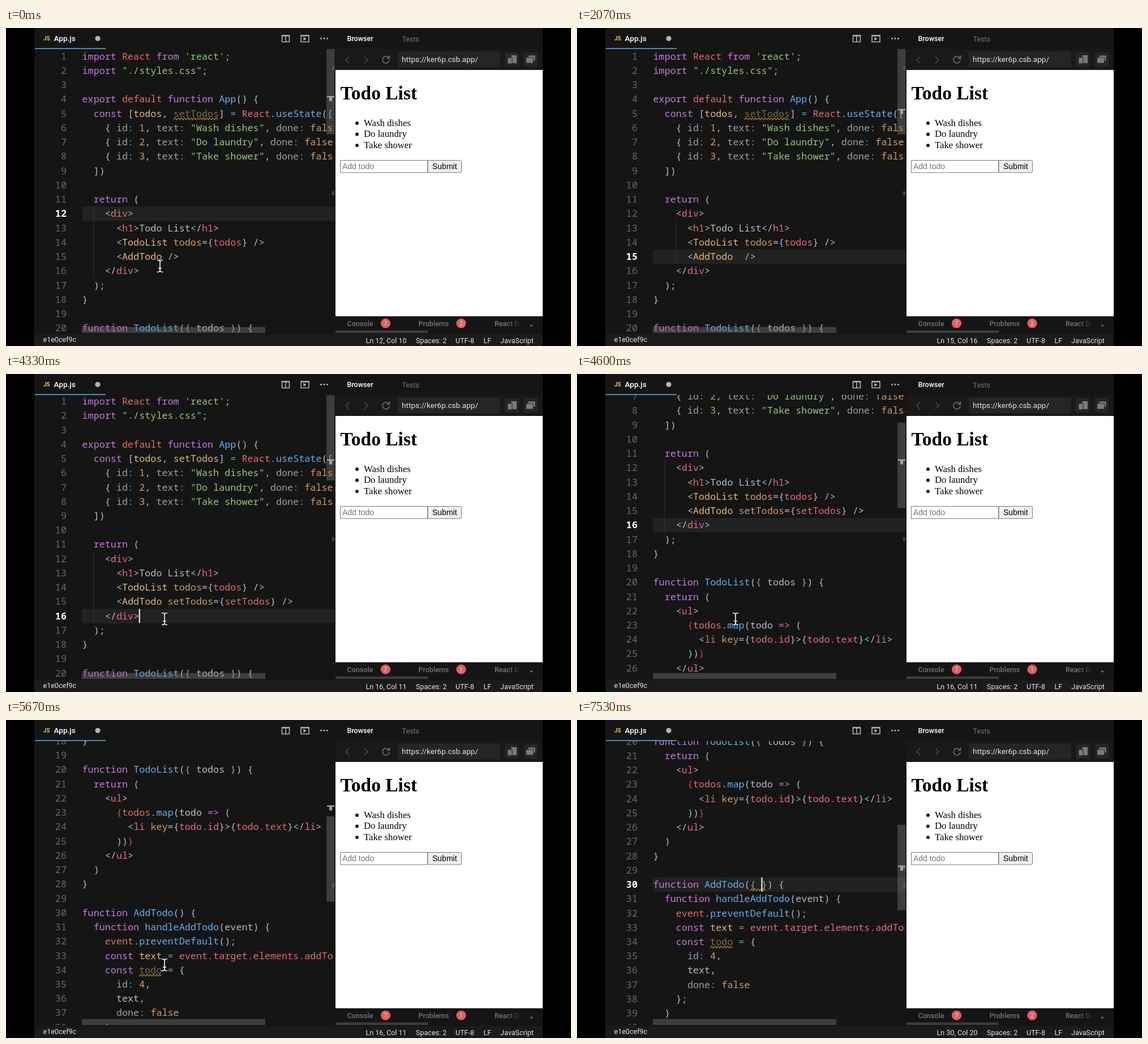
Recreate the animation shown at these times as an HTML page. Size 998 by 561 pixels, loop 8 s.

```html
<!DOCTYPE html>
<html lang="en">
<head>
<meta charset="utf-8">
<title>Todo List editor</title>
<style>
  html, body { margin: 0; width: 100%; height: 100%; overflow: hidden; background: #000; }
  svg { display: block; width: 998px; height: 561px; }
  text { white-space: pre; }
  .ui { font: 12.55px Roboto, sans-serif; fill: #e3e3e3; }
  .dim { fill: #757575; }
  .mid { font-weight: 500; }
  .code { font: 16.8px "Noto Sans Mono", monospace; }
  .num { text-anchor: end; fill: #686868; }
  .num.on { fill: #fff; font-weight: 600; }
  .page { font: 16.75px "Liberation Serif", serif; fill: #000; }
  .form { font: 14px "Liberation Sans", sans-serif; fill: #000; }
  .badge { font: 10.5px Roboto, sans-serif; fill: #f4dada; text-anchor: middle; }
  .line { fill: none; stroke: #b5b5b5; stroke-width: 1.6; }
  .wave { fill: none; stroke: #b8922c; stroke-width: 1.1; }
  .thumb { fill: #797979; fill-opacity: .4; }
  .mark { fill: #284a2d; }
</style>
</head>
<body>
<svg viewBox="0 0 998 561">
  <defs>
    <clipPath id="pane"><rect x="50" y="37" width="531" height="501"/></clipPath>
    <clipPath id="textArea"><rect x="50" y="0" width="528.5" height="1100"/></clipPath>
    <linearGradient id="fade" x1="885" x2="914" y1="0" y2="0" gradientUnits="userSpaceOnUse">
      <stop offset="0" stop-color="#757575"/><stop offset="1" stop-color="#757575" stop-opacity="0"/>
    </linearGradient>
    <clipPath id="tabEnd"><rect x="860" y="510" width="48" height="22"/></clipPath>
  </defs>

  <rect width="998" height="561"/>
  <rect x="50" width="898" height="561" fill="#151515"/>

  <!-- code pane -->
  <g clip-path="url(#pane)">
    <g id="scroller">
      <rect id="band" x="134.5" width="446.5" height="25.2" fill="#222"/>
      <path id="guide" stroke="#343434"/>
      <g id="lines" class="code" clip-path="url(#textArea)"></g>
      <path id="waveSet" class="wave"/>
      <path id="waveTodo" class="wave"/>
      <path id="waveArg" class="wave"/>
      <rect id="caret" width="2" height="25" fill="#fff"/>
    </g>
  </g>
  <rect id="markSet" class="mark" x="576" y="67.5" width="4.5" height="6.5"/>
  <rect id="markArg" class="mark" x="576" y="257.5" width="4.5" height="6.5"/>
  <rect class="mark" x="575.5" y="288" width="5" height="7"/>
  <rect id="thumb" class="thumb" x="566" y="37" width="14.5" height="150.5"/>
  <path id="ruler" fill="#a2a2a2" d="M567-4H580V-1.5H576V5H571V-1.5H567Z"/>
  <rect class="thumb" x="134" y="527.5" width="324" height="10.5"/>

  <!-- file tab -->
  <text class="ui" x="66" y="22" style="font-size:10px;font-weight:700;fill:#e8bf45">JS</text>
  <text class="ui mid" x="84.5" y="23" style="font-size:13.6px;fill:#fff">App.js</text>
  <circle cx="162" cy="18.5" r="4.6" fill="#b4b4b4"/>
  <rect x="51" y="35.5" width="125" height="1.6" fill="#58aede"/>
  <path class="line" d="M487.500 13h13v11.500h-13zM494 13v11.500M487 14h14"/>
  <path class="line" d="M521 13h14v11.500h-14zM521 14h14"/>
  <path fill="#b5b5b5" d="M525.500 15.800l5 3.200l-5 3.200z"/>
  <g fill="#b5b5b5"><circle cx="556.500" cy="18.500" r="1.6"/><circle cx="562" cy="18.500" r="1.6"/><circle cx="567.500" cy="18.500" r="1.6"/></g>

  <!-- browser pane -->
  <text class="ui mid" x="602.500" y="23" style="fill:#fff">Browser</text>
  <text class="ui dim" x="699.500" y="23.500">Tests</text>
  <rect x="582" y="37" width="366" height="36" fill="#191919"/>
  <path class="line" style="stroke:#484848" d="M606 50l-6 6l6 6M633 50l6 6l-6 6"/>
  <path class="line" style="stroke:#757575" d="M676 52.500A6 6 0 1 0 677 57M677.500 48.500V53.500H672.500"/>
  <rect x="692" y="41.500" width="181" height="28" rx="2" fill="#252525"/>
  <text class="ui" x="699" y="60" style="font-size:13.6px">https://ker6p.csb.app/</text>
  <g fill="#252525"><rect x="881" y="43" width="25" height="25" rx="2"/><rect x="915" y="43" width="24" height="25" rx="2"/></g>
  <g fill="#7a7a7a" stroke="#252525">
    <rect x="892" y="47.500" width="10.500" height="15"/><rect x="886" y="52" width="8" height="11"/>
    <rect x="922" y="48" width="13" height="10"/><rect x="918.500" y="52" width="13" height="10"/>
  </g>
  <rect x="582" y="74" width="366" height="434.500" fill="#fff"/>
  <text class="page" x="590.500" y="126" style="font-size:33.5px;font-weight:700">Todo List</text>
  <g id="items" class="page"></g>
  <rect x="590.500" y="233.500" width="154" height="21.500" fill="#fff" stroke="#767676"/>
  <text class="form" x="594" y="249" style="fill:#757575">Add todo</text>
  <rect x="745" y="233.500" width="59.500" height="21.500" rx="2" fill="#efefef" stroke="#767676"/>
  <text class="form" x="753" y="249">Submit</text>

  <!-- tool tabs -->
  <text class="ui mid dim" x="602.500" y="526">Console</text>
  <text class="ui mid dim" x="728.500" y="526">Problems</text>
  <text class="ui mid" x="863" y="526" style="fill:url(#fade)" clip-path="url(#tabEnd)">React Dev</text>
  <g fill="#e25f5f"><circle cx="670.500" cy="521" r="8.600"/><circle cx="804" cy="521" r="8.600"/></g>
  <text class="badge" x="670.500" y="524.700">7</text>
  <text class="badge" x="804" y="524.700" id="problems"></text>
  <path class="line" style="stroke:#8a8a8a;stroke-width:1.300" d="M926 526l2-2l2 2"/>
  <rect x="582" y="533.500" width="163" height="4.500" fill="#3c3c3c"/>

  <!-- status bar -->
  <rect x="50" y="540" width="898" height="21" fill="#1b1b1b"/>
  <g class="ui">
    <text x="65.500" y="554">e1e0cef9c</text>
    <text x="635.500" y="555.500" id="place"></text>
    <text x="724" y="555.500">Spaces: 2</text>
    <text x="794" y="555.500">UTF-8</text>
    <text x="843.500" y="555.500">LF</text>
    <text x="873" y="555.500">JavaScript</text>
  </g>

  <g id="mouse" fill="none" stroke-linecap="round"></g>
</svg>

<script>
const $ = id => document.getElementById(id);
const LOOP = 8000, TICK = 1000 / 15, BLINK = 530;
const LEFT = 134.5, CHAR = 10.08, ROW = 25.24, TOP = 50;
const colX = col => LEFT + (col - 1) * CHAR;
const rowY = row => TOP + (row - 1) * ROW;

function add(parent, tag, attrs, text = '') {
  const el = document.createElementNS('http://www.w3.org/2000/svg', tag);
  for (const k in attrs) el.setAttribute(k, attrs[k]);
  el.textContent = text;
  return parent.appendChild(el);
}

// Token notation: colour key followed by its text, separated by "|".
const COLORS = {
  p: '#c678dd', r: '#e06c75', g: '#98c379', b: '#61afef', y: '#e2b772', o: '#d19a66',
  w: '#b4bac5', c: '#56aabf', k: '#be5046', d: '#80694a', n: '#999da5'
};
const item = (id, text) => `w    { |nid|c: |o${id}|w, |ntext|c: |g"${text}"|w, |ndone|c: |ofalse|w },`;
const stateLine = used => `p  const |w[|ytodos|w, |${used ? 'y' : 'd'}setTodos|w] |c= |rReact|w.|buseState|w([`;
const addTag = attr => `w      <|yAddTodo|${attr}|w />`;
const addFn = arg => `pfunction |bAddTodo|w(|n${arg}|w) {`;

const CODE = [
  `pimport |rReact |pfrom |g'react'|w;`,
  `pimport |g"./styles.css"|w;`,
  ``,
  `pexport |rdefault |pfunction |bApp|w() {`,
  stateLine(false),
  item(1, 'Wash dishes'),
  item(2, 'Do laundry'),
  item(3, 'Take shower'),
  `w  ])`,
  ``,
  `p  return |w(`,
  `w    <|rdiv|w>`,
  `w      <|rh1|w>Todo List</|rh1|w>`,
  `w      <|yTodoList |otodos|w={|rtodos|w} />`,
  addTag(''),
  `w    </|rdiv|w>`,
  `w  );`,
  `w}`,
  ``,
  `pfunction |bTodoList|w(|n{ |wtodos |n}|w) {`,
  `p  return |w(`,
  `w    <|rul|w>`,
  `k      {|rtodos|w.|bmap|w(todo |p=> |w(`,
  `w        <|rli |okey|w={|rtodo.id|w}>{|rtodo.text|w}</|rli|w>`,
  `w      ))|k}`,
  `w    </|rul|w>`,
  `w  )`,
  `w}`,
  ``,
  addFn(''),
  `p  function |bhandleAddTodo|w(event) {`,
  `r    event|w.|bpreventDefault|w();`,
  `p    const |ytext |c= |revent.target.elements.addTodo.value|w;`,
  `p    const |dtodo |c= |w{`,
  `n      id|c: |o4|w,`,
  `w      text,`,
  `n      done|c: |ofalse`,
  `w    };`,
  `w  }`,
  ``
];

function paint(el, src) {
  if (el.src === src) return;
  el.src = src;
  el.textContent = '';
  for (const tok of src.split('|')) {
    if (tok) add(el, 'tspan', { fill: COLORS[tok[0]] }, tok.slice(1));
  }
}

const rows = CODE.map((src, i) => {
  const y = rowY(i + 1) + 5.7;
  const num = add($('lines'), 'text', { class: 'num', x: 107, y }, i + 1);
  const text = add($('lines'), 'text', { x: LEFT, y });
  paint(text, src);
  return { num, text };
});

function wave(id, row, from, to) {
  const y = rowY(row) + 9.3, end = colX(to);
  let d = '', up = 1;
  for (let x = colX(from); x <= end; x += 2.8, up = -up) d += `${d ? 'L' : 'M'}${x} ${y + 1.7 * up}`;
  $(id).setAttribute('d', d);
}
wave('waveSet', 5, 17, 25);
wave('waveTodo', 34, 11, 15);
wave('waveArg', 30, 18, 21);

['Wash dishes', 'Do laundry', 'Take shower'].forEach((name, i) => {
  const y = 172.7 + i * 19.6;
  add($('items'), 'circle', { cx: 620, cy: y - 4.8, r: 2.9 });
  add($('items'), 'text', { x: 632, y }, name);
});

const BEAM = 'M-4.500-10.500Q0-10.500 0-7.500Q0-10.500 4.500-10.500M0-8V8M-4.500 10.500Q0 10.500 0 7.500Q0 10.500 4.500 10.500M-2.500 4H2.500';
add($('mouse'), 'path', { d: BEAM, stroke: '#111', 'stroke-width': 3 });
add($('mouse'), 'path', { d: BEAM, stroke: '#fff', 'stroke-width': 1.6 });

// Edits: time, row, column, then what changes from there on.
const ATTR = 'w |osetTodos';
const EDITS = [
  [-BLINK, 12, 10, { attr: '', arg: '', used: false, bad: false, problems: 2 }],
  [130, 15, 14],
  [730, 15, 15],
  [1530, 15, 16, { attr: 'w ' }],
  [2130, 15, 17, { attr: 'w |os' }],
  [2600, 15, 24, { attr: ATTR }],
  [2730, 15, 25, { attr: ATTR + '|w=', used: true, problems: 1 }],
  [2930, 15, 26, { attr: ATTR + '|w={}' }],
  [3000, 15, 27, { attr: ATTR + '|w={|rs|w}' }],
  [3070, 15, 28, { attr: ATTR + '|w={|rse|w}' }],
  [3400, 15, 29, { attr: ATTR + '|w={|rset|w}' }],
  [3530, 15, 34, { attr: ATTR + '|w={|rsetTodos|w}' }],
  [4070, 16, 11],
  [6930, 30, 18],
  [7270, 30, 19, { arg: '{}' }],
  [7400, 30, 20, { arg: '{ }' }],
  [7530, 30, 20, { bad: true, problems: 2 }]
];

function editAt(t) {
  const s = {};
  for (const [at, row, col, change] of EDITS) {
    if (at <= t) Object.assign(s, { at, row, col }, change);
  }
  return s;
}

// Scroll offset: time, y.
const SCROLL = [
  [4267, 0], [4333, 1.5], [4400, 26], [4467, 76], [4533, 128], [4600, 162],
  [4867, 162], [4933, 185], [5000, 250], [5067, 322], [5133, 371.5],
  [5467, 371.5], [5533, 382], [5600, 410], [5667, 442], [5733, 461],
  [5867, 461], [5933, 466], [6000, 477.5], [6067, 491.6]
];
// Pointer: time, x, y.
const MOUSE = [
  [200, 272, 420], [467, 272, 405], [800, 271, 405], [1067, 282, 380], [1267, 276, 355],
  [3667, 276, 355], [4000, 280, 432], [6200, 280, 432], [6733, 310, 303]
];
const HIDDEN = [[1530, 3730], [7270, LOOP]];

function along(points, t, k) {
  const i = points.findIndex(p => p[0] > t);
  if (i === 0) return points[0][k];
  if (i < 0) return points[points.length - 1][k];
  const a = points[i - 1], b = points[i];
  return a[k] + (b[k] - a[k]) * (t - a[0]) / (b[0] - a[0]);
}

const show = (id, on) => $(id).setAttribute('visibility', on ? 'visible' : 'hidden');

function render(time) {
  const tick = Math.floor((time + 5) / TICK) * TICK, t = tick + 5;
  const s = editAt(t), scroll = along(SCROLL, tick, 1);

  $('scroller').setAttribute('transform', `translate(0 ${-scroll})`);
  $('thumb').setAttribute('y', 37 + scroll * .301);
  $('ruler').setAttribute('transform', `translate(0 ${124 + (s.row - 12) * 7.6})`);
  $('band').setAttribute('y', rowY(s.row) - ROW / 2);
  rows.forEach((r, i) => r.num.setAttribute('class', i + 1 === s.row ? 'num on' : 'num'));

  paint(rows[4].text, stateLine(s.used));
  paint(rows[14].text, addTag(s.attr));
  paint(rows[29].text, addFn(s.arg));
  show('waveSet', !s.used);
  show('markSet', !s.used);
  show('waveArg', s.bad);
  show('markArg', s.bad);

  const [col, from, to] = s.row === 15 ? [5, 13, 15] : [3, 12, 16];
  $('guide').setAttribute('d', `M${colX(col)} ${rowY(from) - ROW / 2}V${rowY(to) + ROW / 2}`);
  show('guide', s.row < 30);

  $('caret').setAttribute('x', colX(s.col) - .5);
  $('caret').setAttribute('y', rowY(s.row) - ROW / 2);
  show('caret', Math.floor((t - s.at) / BLINK) % 2 === 0);

  $('problems').textContent = s.problems;
  $('place').textContent = `Ln ${s.row}, Col ${s.col}`;
  $('mouse').setAttribute('transform', `translate(${along(MOUSE, tick, 1)} ${along(MOUSE, tick, 2)})`);
  show('mouse', !HIDDEN.some(([a, b]) => t >= a && t < b + 5));
}

const start = performance.now();
function frame() {
  render((performance.now() - start) % LOOP);
  requestAnimationFrame(frame);
}
frame();
</script>
</body>
</html>
```
